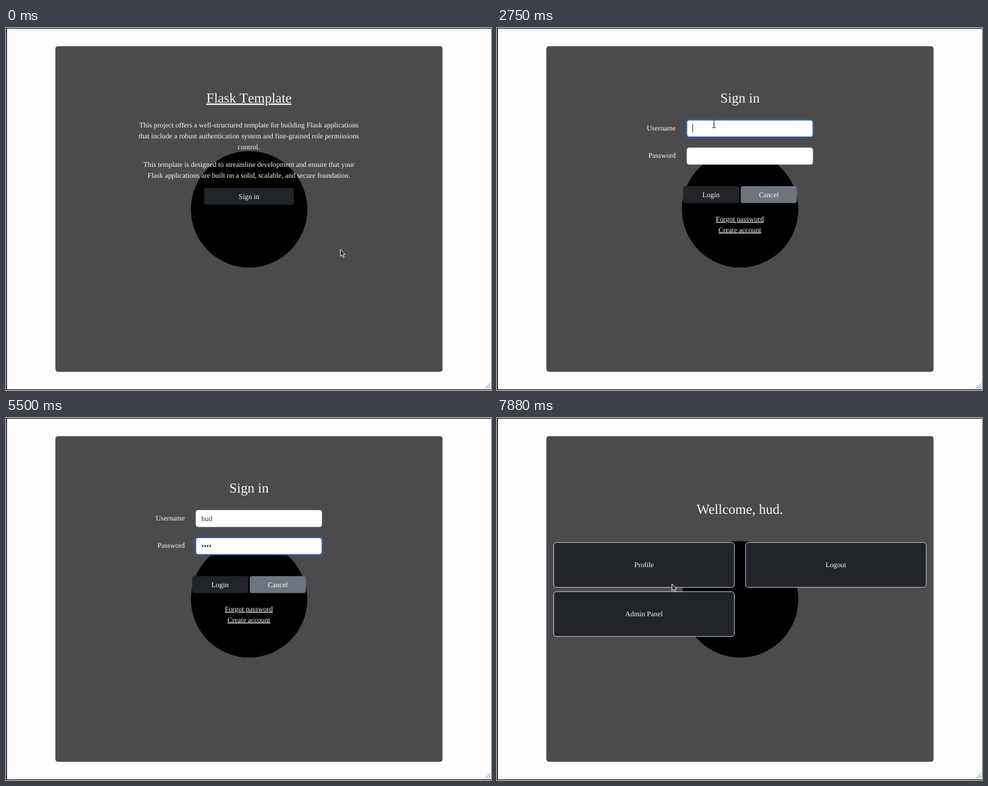
Recreate the animation shown at these times as an HTML page. Size 800x597 px, loop 8 s.

```html
<!DOCTYPE html>
<html lang="en">
<head>
<meta charset="utf-8">
<title>Flask Template</title>
<style>
html, body { margin: 0; width: 100%; height: 100%; overflow: hidden; background: #fffdff; }
svg { display: block; width: 100vw; height: 100vh; }
text { font: 11.83px "Liberation Serif", "Times New Roman", serif; fill: #f8f9fa; text-anchor: middle; text-rendering: geometricPrecision; }
#home text { font-kerning: none; }
.title { font-size: 22.7px; }
.link { text-decoration: underline; }
.label { text-anchor: end; }
.value { text-anchor: start; fill: #212529; }
.hover { font-weight: bold; font-size: 13.1px; }
.dark { fill: #212529; }
.grey { fill: #6c757d; }
.input { fill: #fff; stroke: #dee2e6; stroke-width: .7; }
.card { fill: #212529; stroke: #dee2e6; stroke-width: .9; }
.glow { fill: none; stroke: #0d6efd; stroke-opacity: .22; stroke-width: 3; }
.ring { fill: none; stroke: #2d59ab; stroke-width: 1.2; }
.caret { fill: #212529; }
.cursor { fill: #2b2b2d; stroke: #fff; stroke-width: .9; stroke-linejoin: round; }
</style>
</head>
<body>
<svg viewBox="0 0 800 597" preserveAspectRatio="none">
  <rect width="800" height="597" fill="#fffdff"/>
  <path d="M0 0H800V1H1.4V596H800V597H0Z"/>
  <path d="M790 595L799 586M794 595L799 590" stroke="#777"/>
  <rect x="81.9" y="30.4" width="637.7" height="536.2" rx="4" fill="#4c4a4c" stroke="#3d3b3d" stroke-width=".8"/>
  <circle cx="401" cy="299" r="96"/>

  <g id="home">
    <text class="title link" x="400.8" y="122.5">Flask Template</text>
    <text x="400.6" y="164">This project offers a well-structured template for building Flask applications</text>
    <text x="400.6" y="181.8">that include a robust authentication system and fine-grained role permissions</text>
    <text x="400.6" y="199.5">control.</text>
    <text x="400.6" y="229">This template is designed to streamline development and ensure that your</text>
    <text x="400.6" y="246.7">Flask applications are built on a solid, scalable, and secure foundation.</text>
    <rect id="enterBox" class="dark" x="327" y="263.7" width="147.8" height="27.8" rx="4"/>
    <text id="enter" x="400.8" y="281.5">Sign in</text>
  </g>

  <g id="form">
    <text class="title" x="400.8" y="122.5">Sign in</text>
    <text class="label" x="295" y="168.6">Username</text>
    <text class="label" x="295" y="214.3">Password</text>
    <rect class="input" x="313.2" y="152.1" width="207.8" height="27.4" rx="4"/>
    <rect class="input" x="313.2" y="197.6" width="207.8" height="27.4" rx="4"/>
    <g id="focus">
      <rect class="glow" x="311.5" y="150.5" width="211" height="30.5" rx="5.5"/>
      <rect class="ring" x="313" y="152" width="208.2" height="27.6" rx="4"/>
    </g>
    <text id="user" class="value" x="322.3" y="169.6"></text>
    <text id="pass" class="value" x="322.3" y="214.8"></text>
    <rect id="caret" class="caret" width="1" height="13.5"/>
    <rect id="loginGlow" x="304.8" y="258.6" width="97" height="32.6" rx="6" fill="#424649" fill-opacity=".5"/>
    <rect id="loginBox" class="dark" x="307" y="260.8" width="92.5" height="28" rx="4"/>
    <rect id="cancelBox" class="grey" x="402" y="260.8" width="92.7" height="28" rx="4"/>
    <text id="login" x="353" y="278.5">Login</text>
    <text id="cancel" x="448.3" y="278.5">Cancel</text>
    <g id="links">
      <text class="link" x="400.6" y="318.8">Forgot password</text>
      <text class="link" x="400.6" y="336.5">Create account</text>
    </g>
  </g>

  <g id="menu">
    <text class="title" x="400.6" y="158">Wellcome, hud.</text>
    <rect class="card" x="93.5" y="205.3" width="298" height="74" rx="4.5"/>
    <rect class="card" x="410" y="205.3" width="298" height="74" rx="4.5"/>
    <rect class="card" x="93.5" y="286.3" width="298" height="74" rx="4.5"/>
    <text x="242.5" y="246">Profile</text>
    <text x="559" y="246">Logout</text>
    <text x="242.5" y="327">Admin Panel</text>
  </g>

  <g id="pointer">
    <path id="arrow" class="cursor" d="M.5 .5V12L3 9.7L5 14L6.9 13.1L5 9H8.6Z"/>
    <path id="hand" class="cursor" d="M-1.5 .5Q0-1 1 .5V5L6 6Q8 6.5 7.5 9L6.5 13H0L-3.5 8.5Q-4 7-2.5 7L-1.5 8Z"/>
    <path id="beam" fill="none" stroke="#444" stroke-width="1.1" d="M-3-6.5Q0-6.5 0-5V5Q0 6.5-3 6.5M3-6.5Q0-6.5 0-5V5Q0 6.5 3 6.5M-1.5 1H1.5"/>
  </g>
</svg>
<script>
const LOOP = 8000;
const $ = id => document.getElementById(id);
const show = (id, on) => $(id).style.display = on ? "" : "none";
const set = (id, attrs) => { for (const k in attrs) $(id).setAttribute(k, attrs[k]); };
const within = (t, a, b) => t >= a && t < b;
const fade = (t, start, ms = 150) => Math.min(1, Math.max(0, (t - start) / ms));
const typed = (t, text, start, step) =>
  text.slice(0, t < start ? 0 : 1 + Math.floor((t - start) / step));

// [time, x, y] of the pointer's hot spot
const route = [
  [0, 551, 364.5], [120, 551, 364.5], [250, 587, 396], [380, 560, 270], [500, 500, 150],
  [630, 440, 124], [750, 419, 235], [900, 419, 235], [1000, 412, 266], [1250, 410, 264],
  [1510, 410, 264], [1630, 380, 200], [1750, 358, 158], [7260, 358, 158], [7380, 330, 180],
  [7500, 272, 235], [7630, 236, 290], [7750, 256, 296], [7880, 288, 273], [8000, 288, 273]
];

function place(t) {
  const i = Math.max(1, route.findIndex(p => p[0] > t));
  const [a, b] = [route[i - 1], route[i]];
  const k = (t - a[0]) / (b[0] - a[0]);
  return [a[1] + (b[1] - a[1]) * k, a[2] + (b[2] - a[2]) * k];
}

function drawForm(t) {
  const hover = within(t, 1250, 1580);
  $("cancel").classList.toggle("hover", hover);
  set("cancelBox", { height: hover ? 30 : 28 });
  set("loginBox", { y: hover ? 261.8 : 260.8 });
  set("login", { y: hover ? 279.9 : 278.5 });
  set("cancel", { y: hover ? 280.2 : 278.5 });
  set("links", { transform: `translate(0 ${hover ? 2.3 : 0})` });

  const inPass = t >= 3620;
  const strength = inPass ? fade(t, 3620) * (1 - fade(t, 5740)) : fade(t, 1750);
  set("focus", { opacity: strength, transform: `translate(0 ${inPass ? 45.5 : 0})` });

  const name = typed(t, "hud", 3000, 250);
  const dots = typed(t, "••••", 4625, 125);
  $("user").textContent = name;
  $("pass").textContent = dots;
  show("caret", within(t, 1750, 2250) || within(t, 2740, 4240) || within(t, 4625, 4990));
  set("caret", {
    x: 322.3 + (inPass ? dots.length * 4.15 : name.length * 5.92),
    y: inPass ? 204 : 158.5
  });

  const active = fade(t, 5740);
  const mix = (a, b) => Math.round(a + (b - a) * active);
  $("loginBox").style.fill = `rgb(${mix(33, 62)},${mix(37, 64)},${mix(41, 68)})`;
  set("loginGlow", { opacity: active });
}

function draw(t) {
  show("home", t < 1240);
  show("form", within(t, 1240, 6870));
  show("menu", t >= 6870);

  const onEnter = t >= 1000;
  $("enter").classList.toggle("hover", onEnter);
  set("enterBox", { height: onEnter ? 29.8 : 27.8 });
  set("enter", { y: onEnter ? 283 : 281.5 });
  drawForm(t);

  const [x, y] = place(t);
  set("pointer", { transform: `translate(${x} ${y})` });
  show("arrow", t < 1000 || within(t, 1580, 1700) || t >= 7370);
  show("hand", within(t, 1000, 1580));
  show("beam", within(t, 1700, 3000) || within(t, 6740, 7370));
}

function tick() {
  draw(performance.now() % LOOP);
  requestAnimationFrame(tick);
}
tick();
</script>
</body>
</html>
```
